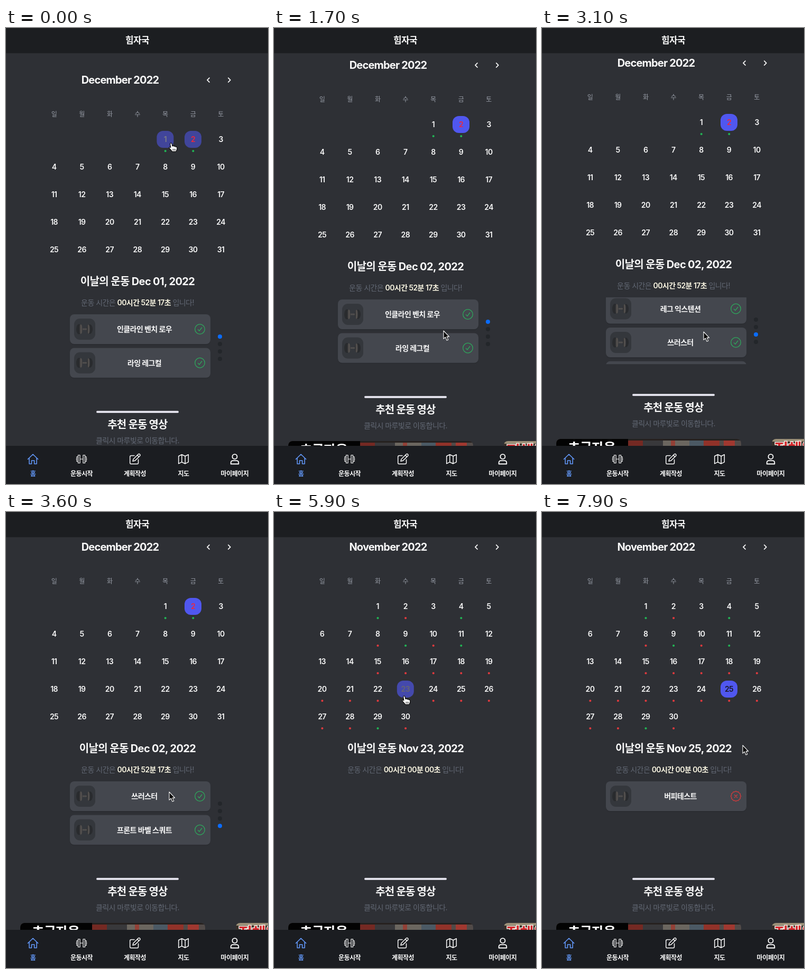
Write an HTML page that moves like this. It is 496x860 px and loops after 8 s.

```html
<!DOCTYPE html>
<html lang="ko">
<head>
<meta charset="utf-8">
<title>운동 달력</title>
<style>
  html, body { margin: 0; width: 100%; height: 100%; overflow: hidden; background: #2e3035; }
  svg { display: block; width: 100vw; height: 100vh; }
  text {
    font-family: Inter, "Noto Sans CJK KR", "Noto Sans CJK", "Noto Sans", sans-serif;
    letter-spacing: -.04em; text-anchor: middle; white-space: pre;
  }
  #date { letter-spacing: -.032em; }
  .line { fill: none; stroke-linecap: round; stroke-linejoin: round; }
</style>
</head>
<body>
<svg id="stage" viewBox="0 0 496 860"></svg>
<script>
const LOOP = 8000, STEP = 100, PITCH = 63.5, FADE = 200;
const stage = document.getElementById('stage');
const WHITE = '#fafafa', MUTED = '#626874', GREEN = '#22b455', RED = '#e03a3e';

// y is the optical middle of the line
const label = (x, y, size, weight, fill, body, extra = '') =>
  `<text x="${x}" y="${(y + size * .36).toFixed(2)}" font-size="${size}" font-weight="${weight}" fill="${fill}" ${extra}>${body}</text>`;
const line = (d, color, width) =>
  `<path class="line" d="${d}" stroke="${color}" stroke-width="${width}"/>`;
const at = (x, y, body, extra = '') => `<g transform="translate(${x} ${y})" ${extra}>${body}</g>`;
const colX = i => 91 + 52.6 * i;

// ---- calendar ----
const months = {
  dec: { first: 4, days: 31, done: [1, 2], missed: [] },
  nov: { first: 2, days: 30, done: [1, 4, 9, 11, 29],
         missed: [2, 8, 10, 30].concat(Array.from({ length: 14 }, (_, i) => 15 + i)) }
};

function calendar(id) {
  const m = months[id];
  let out = '';
  for (let d = 1; d <= m.days; d++) {
    const slot = m.first + d - 1, x = colX(slot % 7), y = 209.5 + 52 * Math.floor(slot / 7);
    const mark = m.done.includes(d) ? GREEN : m.missed.includes(d) ? RED : null;
    const today = id === 'dec' && d === 2;
    out += at(x, y,
      `<rect id="${id}-bg${d}" x="-16" y="-15.5" width="32" height="32" rx="12" fill="#5057ef" opacity="0"/>` +
      label(0, 0, 14, 600, today ? '#f0283a' : WHITE, d, `id="${id}-n${d}"`) +
      (mark ? `<circle cx=".3" cy="22.5" r="2.1" fill="${mark}"/>` : ''));
  }
  return `<g id="${id}">${out}</g>`;
}

// ---- workout cards ----
const dumbbell =
  `<rect x="8" y="8" width="40" height="40" rx="11" fill="#34373c"/>
  <rect x="19" y="26.5" width="17" height="3" fill="#4f4d4c"/>
  <ellipse cx="17" cy="28" rx="5" ry="9.5" fill="#292b2e"/>
  <ellipse cx="38" cy="28" rx="5" ry="9" fill="#292b2e"/>
  <ellipse cx="20.5" cy="28" rx="3.5" ry="9" fill="url(#plate)"/>
  <ellipse cx="35" cy="28" rx="3" ry="8.5" fill="url(#plate)"/>`;

const okBadge = `<circle r="9.3" fill="none" stroke="#2ea85c" stroke-width="1.3"/>` +
  line('M-3.6 .6L-1 3.2L3.8 -3', '#2ea85c', 1.3);

function badBadge() {
  let d = '';
  for (let i = 0; i <= 72; i++) {
    const a = i / 72 * Math.PI * 2, r = 9 + .5 * Math.cos(a * 12);
    d += `${i ? 'L' : 'M'}${(r * Math.cos(a)).toFixed(2)} ${(r * Math.sin(a)).toFixed(2)}`;
  }
  return line(d + 'Z', '#d63a3c', 1.3) + line('M-2.5 -2.5L2.5 2.5M2.5 -2.5L-2.5 2.5', '#d63a3c', 1.3);
}

const card = (name, i, badge) => at(121, 540 + PITCH * i,
  `<rect y="2" width="266" height="56" rx="8" fill="#000" opacity=".08"/>` +
  `<rect width="266" height="56" rx="8" fill="#44474e"/>` + dumbbell +
  label(141, 28, 14, 700, WHITE, name) + at(246, 28, badge));

const workouts = ['인클라인 벤치 로우', '라잉 레그컬', '레그 익스텐션', '쓰러스터', '프론트 바벨 스쿼트'];

// ---- recommended videos ----
const thumbs =
  `<g clip-path="url(#thumb)">
    <rect x="27" y="807" width="350" height="60" fill="#514a48"/>
    <rect x="27" y="807" width="136" height="60" fill="#030303"/>
    <rect x="163" y="807" width="28" height="60" fill="#742923"/>
    <rect x="191" y="807" width="38" height="60" fill="#38383b"/>
    <rect x="229" y="807" width="50" height="60" fill="#6b665f"/>
    <rect x="244" y="807" width="8" height="60" fill="#934036"/>
    <rect x="279" y="807" width="27" height="60" fill="#4b5964"/>
    <rect x="306" y="807" width="30" height="60" fill="#913229"/>
    <rect x="344" y="807" width="21" height="60" fill="#a03830"/>
    <rect x="163" y="807" width="214" height="3" fill="#26211f"/>` +
    label(94, 824, 25.5, 700, '#fff', '초급자용') + `</g>
  <g clip-path="url(#thumb2)">
    <rect x="435" y="807" width="90" height="60" fill="#37302a"/>
    <rect x="435" y="807" width="90" height="5" fill="#9b9078"/>` +
    label(478, 827, 29, 700, '#d3262b', '전체용', 'stroke="#f2eee6" stroke-width="3" paint-order="stroke"') + `</g>`;

// ---- bottom bar ----
const BLUE = '#6297f7';
const tabs = [
  [51, '홈', BLUE, line('M-9.6 .3L0 -9L9.6 .3M-7 -2V9H-2.6V2.8H2.6V9H7V-2', BLUE, 1.6)],
  [143, '운동시작', WHITE, line('M-3 0H3M-6.5 -7.5H-3V7.5H-6.5ZM6.5 -7.5H3V7.5H6.5ZM-6.5 -4.5H-9V4.5H-6.5M6.5 -4.5H9V4.5H6.5M-9 0H-10M9 0H10', WHITE, 1.2)],
  [244, '계획작성', WHITE, line('M-1 -6.5H-7Q-9.3 -6.5 -9.3 -4.2V7Q-9.3 9.3 -7 9.3H4.2Q6.5 9.3 6.5 7V1M-4 4L-3 .2L6.4 -9.2Q8 -10.4 9.4 -9Q10.8 -7.5 9.5 -6L0 3.1ZM4.6 -7.4L7.7 -4.3', WHITE, 1.5)],
  [336, '지도', WHITE, line('M-9.3 -5.5L-3.2 -8.5L3.2 -5.5L9.3 -8.5V5.7L3.2 8.7L-3.2 5.7L-9.3 8.7ZM-3.2 -8.5V5.7M3.2 -5.5V8.7', WHITE, 1.5)],
  [433, '마이페이지', WHITE, `<circle cy="-4.6" r="4.5" fill="none" stroke="${WHITE}" stroke-width="1.9"/>` +
    line('M-7.3 9.2V7Q-7.3 2.9 -3 2.9H3Q7.3 2.9 7.3 7V9.2Z', WHITE, 1.9)]
];

stage.innerHTML = `
<defs>
  <linearGradient id="plate"><stop stop-color="#24262a"/><stop offset=".6" stop-color="#5a5653"/><stop offset="1" stop-color="#35363a"/></linearGradient>
  <clipPath id="list"><rect x="115" y="540" width="280" height="126"/></clipPath>
  <clipPath id="thumb"><rect x="27" y="807" width="350" height="197" rx="8"/></clipPath>
  <clipPath id="thumb2"><rect x="435" y="807" width="350" height="197" rx="8"/></clipPath>
</defs>
<rect width="496" height="860" fill="#2e3035"/>
<g id="page">
  ${label(216, 98, 20, 700, WHITE, '', 'id="month"')}
  ${line('M385 94.2L381 98.2L385 102.2M420.8 94.2L424.8 98.2L420.8 102.2', WHITE, 1.7)}
  ${[...'일월화수목금토'].map((d, i) => label(colX(i), 162.7, 12, 500, '#959aa4', d)).join('')}
  ${calendar('dec')}${calendar('nov')}
  ${label(249, 478, 20, 700, WHITE, '', 'id="date"')}
  ${label(249, 518, 14, 400, MUTED, '운동 시간은 <tspan id="spent" fill="#fbf7e3" font-weight="600"></tspan> 입니다!')}
  <g clip-path="url(#list)">
    <g id="cards">${workouts.map((w, i) => card(w, i, okBadge)).join('')}</g>
    <g id="single">${card('버피테스트', 0, badBadge())}</g>
  </g>
  <g id="pager">${[0, 1, 2, 3].map(i => `<circle cx="405" cy="${582 + 14 * i}" r="4"/>`).join('')}</g>
  <rect x="171" y="722" width="156" height="4" rx="2" fill="#dfdee8"/>
  ${label(249, 748, 20, 700, WHITE, '추천 운동 영상')}
  ${label(249, 778, 14, 400, MUTED, '클릭시 마루빛로 이동합니다.')}
  ${thumbs}
</g>
<rect width="496" height="47.5" fill="#1c1e21"/>
${label(248.5, 23, 17, 600, WHITE, '힘자국')}
<rect y="788" width="496" height="72" fill="#1b1d21"/>
${tabs.map(([x, name, color, icon]) => at(x, 813, icon) + label(x, 840.5, 12, 600, color, name)).join('')}
<g id="cursor">
  <g id="hand">
    <path d="M-2.2 1.6C-2.4 -.4 .6 -.6 1 1.4L2 6C3 4.8 5 5 5.3 6.4C6.4 5.4 8 5.9 8.2 7.3C9.6 6.7 10.9 7.5 10.8 9V11C10.6 13 9.4 14 9 16H1.5C.5 14 -2 12 -3.8 9.6C-4.8 7.9 -2.8 6.9 -1.2 8.4Z" fill="#fff" stroke="#000" stroke-width="1.1" stroke-linejoin="round"/>
    ${line('M3 11.2V13.8M5.2 11.2V13.8M7.3 11.2V13.8', '#000', .8)}
  </g>
  <path id="arrow" d="M0 0V15.2L3.5 12L6 18L8.7 16.9L6.2 11.1H10.6Z" fill="#050505" stroke="#fff" stroke-width="1.1" stroke-linejoin="round"/>
</g>`;

// ---- timeline ----
const el = id => document.getElementById(id);
const show = (id, on) => el(id).style.display = on ? '' : 'none';
const clamp = v => Math.max(0, Math.min(1, v));

function track(keys, t) {
  const i = keys.findIndex(k => k[0] > t);
  if (i < 0) return keys[keys.length - 1].slice(1);
  if (i === 0) return keys[0].slice(1);
  const a = keys[i - 1], b = keys[i], p = (t - a[0]) / (b[0] - a[0]);
  return a.slice(1).map((v, j) => v + (b[j + 1] - v) * p);
}

const pointer = [
  [100, 313, 217], [400, 352, 214], [900, 352, 214], [1500, 321, 571], [2000, 321, 571],
  [2300, 323, 525], [2500, 322, 520], [2700, 308, 588], [2800, 308, 540], [3000, 306, 580],
  [3100, 306, 573], [3300, 307, 535], [3600, 309, 528], [4200, 381, 79], [4900, 381, 79],
  [5600, 247, 347], [6200, 247, 347], [6600, 352, 346], [7200, 352, 346], [7600, 380, 440]
];
const scrollKeys = [[1500, 0], [1600, 18], [1700, 28], [1800, 32]];
const swipe = [
  [2000, 0], [2300, 46], [2400, 51], [2600, PITCH], [2700, PITCH], [2800, 111], [2900, 125],
  [3000, 127], [3100, 133.5], [3300, 172], [3400, 184], [3500, 3 * PITCH]
];
const TURN = 4600;
const picks = [
  { month: 'dec', day: 1, from: -110, to: 400 },
  { month: 'dec', day: 2, from: 400, to: Infinity, before: -90 },
  { month: 'nov', day: 23, from: 5770, to: 6700 },
  { month: 'nov', day: 25, from: 6700, to: Infinity }
];

function mix(p) {
  const c = [250, 250, 250].map((v, i) => Math.round(v + ([24, 24, 38][i] - v) * p));
  return `rgb(${c})`;
}

function render(t) {
  const nov = t >= TURN, fresh = t >= 5800;
  const [x, y] = track(pointer, t), [scroll] = track(scrollKeys, t), [offset] = track(swipe, t);

  el('page').setAttribute('transform', `translate(0 ${-scroll})`);
  el('month').textContent = nov ? 'November 2022' : 'December 2022';
  show('dec', !nov);
  show('nov', nov);

  let current = picks[0];
  for (const s of picks) {
    if (t >= s.from) current = s;
    let p = clamp((t - s.from) / FADE) - clamp((t - s.to) / FADE);
    if (s.before !== undefined && t < s.from) p = 1 - clamp((t - s.before) / FADE);
    el(`${s.month}-bg${s.day}`).setAttribute('opacity', p);
    if (s.day !== 2) el(`${s.month}-n${s.day}`).setAttribute('fill', mix(p));
  }
  const day = String(current.day).padStart(2, '0');
  el('date').textContent = `이날의 운동 ${fresh ? 'Nov' : 'Dec'} ${day}, 2022`;
  el('spent').textContent = fresh ? '00시간 00분 00초' : '00시간 52분 17초';

  show('cards', !fresh);
  show('pager', !fresh);
  show('single', t >= 6000);
  el('cards').setAttribute('transform', `translate(0 ${-offset})`);
  const active = Math.round(offset / PITCH);
  [...el('pager').children].forEach((c, i) => c.setAttribute('fill', i === active ? '#0a6cff' : '#23262a'));

  const hand = t < 1100 || (t >= 4200 && t < 7300);
  show('hand', hand);
  show('arrow', !hand);
  el('cursor').setAttribute('transform', `translate(${x} ${y})`);
}

const start = performance.now();
function frame(now) {
  const t = Math.max(0, now - start) % LOOP;
  render(Math.floor(t / STEP) * STEP);
  requestAnimationFrame(frame);
}
render(0);
requestAnimationFrame(frame);
</script>
</body>
</html>
```
